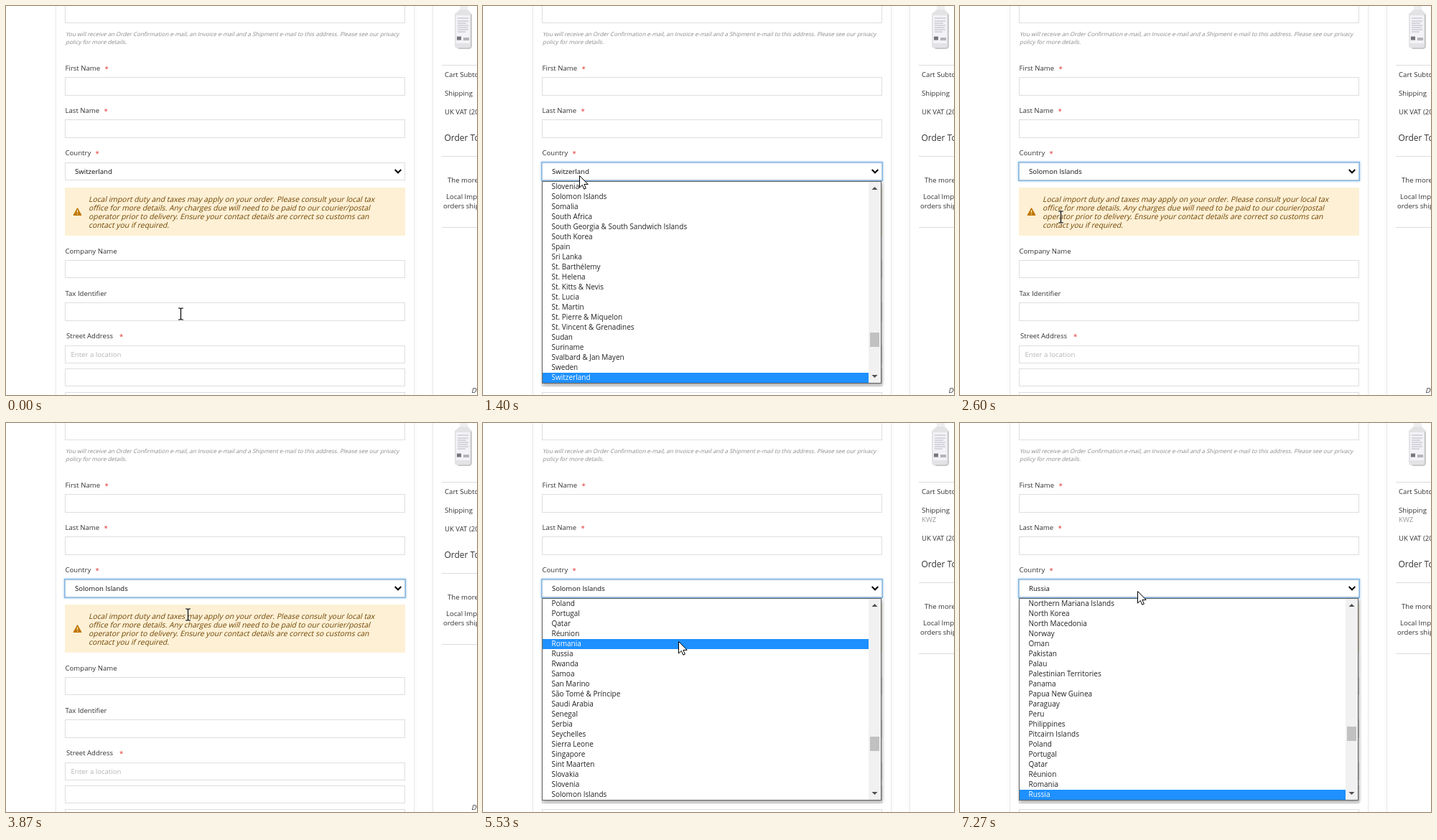
An HTML page for the animation above (8 s loop, 656 by 542 pixels).

```html
<!DOCTYPE html>
<html lang="en">
<head>
<meta charset="utf-8">
<title>Checkout address form</title>
<style>
  html, body { margin: 0; width: 100%; height: 100%; overflow: hidden; background: #fff; }
  svg { display: block; font: 9.6px "Open Sans", sans-serif; fill: #333; }
  text { white-space: pre; }
  .card { fill: #fff; stroke: #e9e9e9; filter: drop-shadow(0 0 2px #0000000c); }
  .input { fill: #fff; stroke: #dedede; }
  .rule { stroke: #dcdcdc; }
  .star { fill: #e02b27; }
  .note { font-size: 8px; fill: #8a8a8a; }
  .warn { font-size: 10.4px; fill: #6f4400; }
  .hint { fill: #b4b4b4; }
  .soft { fill: #999; }
  .total { font-size: 12px; }
  #focus { fill: none; stroke: #7db4e6; filter: drop-shadow(0 0 1.5px #68a8e0); }
  #menu { font-size: 10px; }
  .panel { fill: #fff; stroke: #666; filter: drop-shadow(1px 2px 2px #0006); }
</style>
</head>
<body>
<svg id="stage" width="656" height="542" viewBox="0 0 656 542">
  <rect class="card" x="69.5" y="-10" width="499" height="570"/>
  <rect class="card" x="594.5" y="-10" width="80" height="570"/>
  <g id="form"></g>

  <rect x="82" y="253" width="474" height="67" fill="#fdf0d5"/>
  <path d="M99.5 281.5L105 291.5H94Z" fill="#c07600" stroke="#c07600" stroke-linejoin="round"/>
  <path d="M99.5 284.5v3.5m0 1.2v1.3" stroke="#fdf0d5" stroke-width="1.3"/>
  <g id="warning"></g>

  <rect id="focus" x="81.5" y="217.5" width="475" height="26"/>
  <path d="M541.7 228l4.3 4.3 4.3-4.3" fill="none" stroke="#000" stroke-width="2"/>
  <text id="chosen" x="96" y="234" fill="#111"></text>

  <g id="bottle">
    <rect x="632" y="-3" width="11" height="11" fill="#eeeeef"/>
    <path d="M632 5h11l6 6v44q0 4-4 4h-16q-4 0-4-4V11z" fill="#e3e3e5"/>
    <path d="M648 12v43q0 4-4 4h-14" fill="none" stroke="#c9c9cc" stroke-width="2"/>
    <rect x="627" y="13" width="19" height="39" fill="#f3f2f6"/>
    <path d="M629 17h15m-15 4h15m-15 3h12m-12 3h15m-15 3h14m-14 3h15m-15 3h11" stroke="#b9b7c4"/>
    <path d="M628 45h6" stroke="#77757d" stroke-width="5"/>
    <path d="M637 46h8" stroke="#b5b3ba" stroke-width="4"/>
  </g>
  <path class="rule" d="M607 82.5h60"/>
  <text x="611" y="99">Cart Subtotal</text>
  <text x="611" y="125">Shipping</text>
  <text id="courier" class="soft" x="611" y="138">KWZ</text>
  <g id="below">
    <text x="611" y="151">UK VAT (20%)</text>
    <text class="total" x="610.5" y="188">Order Total</text>
    <path class="rule" d="M607 209.5h60m-60 99h60"/>
    <text x="615" y="246">The more you</text>
    <text x="613" y="269">Local Import</text>
    <text x="609" y="282">orders shipped</text>
    <text transform="translate(648 539) skewX(-14)">Delivery</text>
  </g>

  <g id="menu">
    <rect class="panel" x="82.5" y="244.5" width="472" height="281"/>
    <rect id="bar" x="83" width="454" height="14" fill="#1e90ff"/>
    <g id="rows"></g>
    <rect x="537" y="245" width="17" height="280" fill="#f1f1f1"/>
    <path d="M541.5 256l4-4 4 4zm0 258l4 4 4-4z" fill="#505050"/>
    <rect id="thumb" x="539" width="13" height="20" fill="#c1c1c1"/>
  </g>

  <path id="arrow" d="M.5 .5V17l3.8-3.6 2.5 5.8 2.6-1.1-2.5-5.7h5.3z" fill="#fff" stroke="#000"/>
  <g id="beam" fill="none">
    <path d="M-3 -8h2.5l1 1 1-1H4M.5 -7V7M-3 8h2.5l1-1 1 1H4" stroke="#fff8" stroke-width="2.5"/>
    <path d="M-3 -8h2.5l1 1 1-1H4M.5 -7V7M-3 8h2.5l1-1 1 1H4" stroke="#000" stroke-width="1.2"/>
  </g>
</svg>
<script>
const $ = id => document.getElementById(id);
const show = (id, on) => $(id).style.display = on ? '' : 'none';
const text = (x, y, str, cls = '') => `<text class="${cls}" x="${x}" y="${y}">${str}</text>`;
const slanted = (x, y, str, cls) =>
  `<text class="${cls}" transform="translate(${x} ${y}) skewX(-14)">${str}</text>`;

// Static form: inputs as [top, bottom], labels as [x, baseline, text, asterisk x]
const inputs = [[-2, 23], [99, 124], [158, 183], [218, 242], [354, 378], [413, 438],
  [473, 497], [505, 529], [538, 562]];
const labels = [[82.5, 90, 'First Name', 137.5], [82.5, 149, 'Last Name', 136.5],
  [82.5, 208, 'Country', 124.5], [82.5, 345, 'Company Name'], [82.5, 404, 'Tax Identifier'],
  [84, 463, 'Street Address', 158]];
$('form').innerHTML =
  inputs.map(([a, b]) =>
    `<rect class="input" x="82.5" y="${a + .5}" width="473" height="${b - a}"/>`).join('') +
  labels.map(([x, y, str, star]) =>
    text(x, y, str) + (star ? text(star, y + 1, '*', 'star') : '')).join('') +
  slanted(83, 42, 'You will receive an Order Confirmation e-mail, an Invoice e-mail and a ' +
    'Shipment e-mail to this address. Please see our privacy', 'note') +
  slanted(83, 53, 'policy for more details.', 'note') +
  text(90.5, 489, 'Enter a location', 'hint');
$('warning').innerHTML = [
  'Local import duty and taxes may apply on your order. Please consult your local tax',
  'office for more details. Any charges due will need to be paid to our courier/postal',
  'operator prior to delivery. Ensure your contact details are correct so customs can',
  'contact you if required.'
].map((line, i) => slanted(115, 273 + 12 * i, line, 'warn')).join('');

const countries = ('Northern Mariana Islands,North Korea,North Macedonia,Norway,Oman,Pakistan,Palau,' +
  'Palestinian Territories,Panama,Papua New Guinea,Paraguay,Peru,Philippines,Pitcairn Islands,' +
  'Poland,Portugal,Qatar,Réunion,Romania,Russia,Rwanda,Samoa,San Marino,São Tomé &amp; Príncipe,' +
  'Saudi Arabia,Senegal,Serbia,Seychelles,Sierra Leone,Singapore,Sint Maarten,Slovakia,Slovenia,' +
  'Solomon Islands,Somalia,South Africa,South Georgia &amp; South Sandwich Islands,South Korea,' +
  'Spain,Sri Lanka,St. Barthélemy,St. Helena,St. Kitts &amp; Nevis,St. Lucia,St. Martin,' +
  'St. Pierre &amp; Miquelon,St. Vincent &amp; Grenadines,Sudan,Suriname,Svalbard &amp; Jan Mayen,' +
  'Sweden,Switzerland').split(',');
const SWITZERLAND = 51, SOLOMON = 33, RUSSIA = 19;

// Pointer path: [time, x, y, easing of the way there]
const linear = u => u, easeIn = u => u * u, easeOut = u => u * (2 - u);
const smooth = u => u * u * (3 - 2 * u);
const path = [[0, 243, 429], [533, 112, 225], [1133, 112, 225], [1400, 134, 236, easeIn],
  [2000, 140, 278, linear], [2267, 140, 294, easeOut], [3467, 140, 294], [3600, 138, 300],
  [3867, 253, 267, easeIn], [4267, 405, 262, easeOut], [4467, 405, 262], [5000, 409, 229],
  [5133, 409, 229], [5333, 375, 252, easeIn], [5733, 238, 321, easeOut], [6400, 238, 321],
  [6867, 247, 234], [8000, 247, 234]];

function pointer(t) {
  const i = Math.max(1, path.findIndex(key => key[0] >= t));
  const [t0, x0, y0] = path[i - 1], [t1, x1, y1, ease = smooth] = path[i];
  const u = ease((t - t0) / (t1 - t0));
  return [Math.round(x0 + (x1 - x0) * u), Math.round(y0 + (y1 - y0) * u)];
}

function drawMenu(top, active) {
  $('rows').innerHTML = countries.slice(top, top + 20).map((name, i) =>
    `<text x="95.5" y="${255 + 14 * i}" fill="${top + i === active ? '#fff' : '#222'}">${name}</text>`
  ).join('');
  $('bar').setAttribute('y', 245 + 14 * (active - top));
  $('thumb').setAttribute('y', 423 + top);
}

let last = -1;
function render(now) {
  requestAnimationFrame(render);
  const step = Math.floor((now % 8000 + 4) / (200 / 3));
  if (step === last) return;
  last = step;
  const t = Math.min(8000, Math.round(step * 200 / 3));
  const [x, y] = pointer(t);

  const chosen = t < 2533 ? SWITZERLAND : t < 6000 ? SOLOMON : RUSSIA;
  const open = t >= 800 && t < 2533 || t >= 5067 && t < 6000 || t >= 7267;
  $('chosen').innerHTML = countries[chosen];
  show('focus', t >= 800);
  show('menu', open);
  if (open) {
    const top = chosen - 19 - (t >= 1733 && t < 2533 ? 2 : 0);
    drawMenu(top, y >= 245 ? top + Math.floor((y - 245) / 14) : chosen);
  }

  const courier = t >= 5267;
  show('courier', courier);
  $('below').setAttribute('transform', `translate(0 ${courier ? 13 : 0})`);

  const overInput = inputs.some(([a, b]) => a !== 218 && y >= a && y <= b);
  const overWarning = y >= 262 && y <= 312;
  const beam = !open && t !== 2533 && (overInput || overWarning);
  show('beam', beam);
  show('arrow', !beam);
  $(beam ? 'beam' : 'arrow').setAttribute('transform', `translate(${x} ${y})`);
}
render(0);
</script>
</body>
</html>
```
